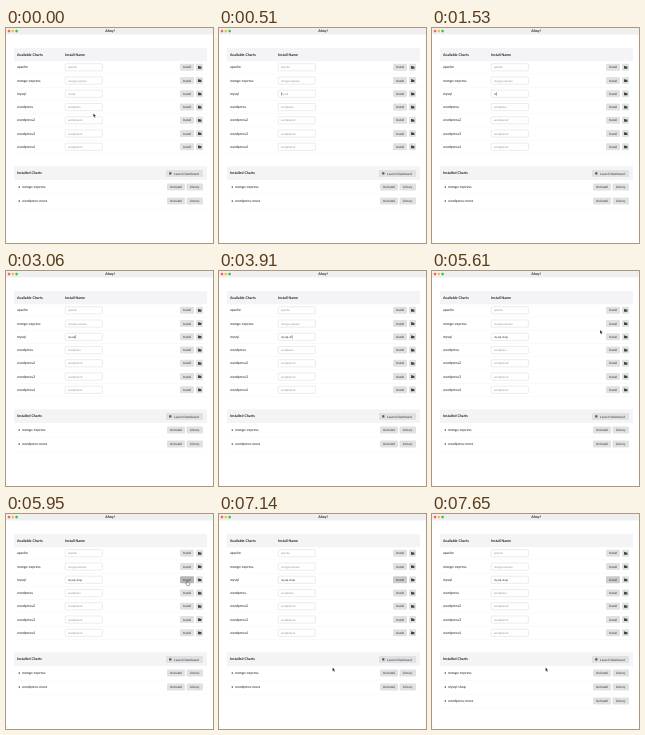
An HTML page for the animation above (8 s loop, 207 px wide and 215 px high).

```html
<!DOCTYPE html>
<html lang="en">
<head>
<meta charset="utf-8">
<title>Charts</title>
<style>
  html, body { margin: 0; width: 100%; height: 100%; overflow: hidden; background: #fff; }
  svg { display: block; width: 100vw; height: 100vh; }
  text { font-family: Lato, "Open Sans", sans-serif; font-size: 3.5px; fill: #222; text-rendering: geometricPrecision; }
  .bold { font-weight: 700; font-size: 3.6px; }
  .btn { font-weight: 700; font-size: 3px; fill: #555; text-anchor: middle; }
  .field { font-size: 2.8px; fill: #8c8c8c; }
  .typed { fill: #222; }
</style>
</head>
<body>
<svg id="stage" viewBox="0 0 207 215" preserveAspectRatio="none"></svg>
<script>
const LOOP = 8000;
const stage = document.getElementById('stage');

function add(tag, attrs, parent = stage) {
  const el = document.createElementNS('http://www.w3.org/2000/svg', tag);
  for (const key in attrs) el.setAttribute(key, attrs[key]);
  return parent.appendChild(el);
}
function rect(x, y, width, height, fill, more = {}, parent) {
  return add('rect', { x, y, width, height, fill, ...more }, parent);
}
function label(x, y, str, cls = '', parent) {
  const el = add('text', { x, y, class: cls }, parent);
  el.textContent = str;
  return el;
}
function line(y, parent) {
  rect(8, y, 193, 0.3, '#eeeeef', {}, parent);
}
function button(x, y, w, str, parent, shift = 0) {
  const box = rect(x, y, w, 7, '#e0e1e2', { rx: 1 }, parent);
  label(x + w / 2 + shift, y + 4.5, str, 'btn', parent);
  return box;
}

// Window bar
rect(0, 0, 207, 215, '#fff');
rect(0, 0, 207, 6.5, '#f0eff0');
['#ff5f57', '#febc2e', '#28c840'].forEach((fill, i) =>
  add('circle', { cx: 3 + i * 3.8, cy: 3.1, r: 1.3, fill }));
const title = label(104, 4.3, 'Ahoy!', 'bold');
title.setAttribute('text-anchor', 'middle');

// Available charts
rect(8, 20, 193, 13.3, '#f4f4f7');
label(11, 28.1, 'Available Charts', 'bold');
label(59, 28.1, 'Install Name', 'bold');

const charts = ['apache', 'mongo-express', 'mysql', 'wordpress', 'wordpress2', 'wordpress3', 'wordpress4'];
const rows = charts.map((name, i) => {
  const y = 39.3 + i * 13.25;
  line(y + 6.5);
  label(11, y + 1.1, name);
  rect(59.2, y - 3.6, 37.2, 7.2, '#fff', { rx: 1, stroke: '#cdced2', 'stroke-width': 0.4 });
  const field = label(62, y + 1, name, 'field');
  const install = button(174, y - 3.5, 14, 'Install');
  rect(190, y - 3.5, 7, 7, '#e0e1e2', { rx: 1 });
  add('path', {
    d: `M192 ${y - 1.3}h1.2l.5 .5h1.7v2.3h-3.4z`, fill: '#444'
  });
  return { field, install };
});
const { field, install } = rows[2];

// Installed charts
rect(8, 138.3, 193, 13.7, '#f4f4f7');
label(11, 146.1, 'Installed Charts', 'bold');
button(160, 142, 37, 'Launch Dashboard', stage, 2);
rect(163.2, 144.3, 2.2, 2.2, '#555', { rx: 0.3 });

function release(name, y) {
  const g = add('g', { transform: `translate(0 ${y})` });
  add('path', { d: 'M12.8 -1.2l1.3 1.2l-1.3 1.2z', fill: '#222' }, g);
  label(16, 1.1, name, '', g);
  button(161, -3.5, 18, 'Uninstall', g);
  button(180.5, -3.5, 16.5, 'Library', g);
  line(6.8, g);
  return g;
}
release('mongo-express', 159.1);
const added = release('mysql-shop', 173.1);
const last = release('wordpress-news', 173.1);
rect(0.8, 212.8, 0.6, 0.6, '#aaa');

const caret = rect(62, 64.1, 0.35, 3.5, '#222');

// Pointers, each with its hot spot at 0,0
const shapes = {
  arrow: add('path', {
    d: 'M0 0v3.7l.9-.8.6 1.4.7-.3-.6-1.4h1.2z',
    fill: '#111', stroke: '#fff', 'stroke-width': 0.3
  }),
  beam: add('path', {
    d: 'M-.7-1.9q.7 0 .7.5v2.8q0 .5-.7.5M.7-1.9q-.7 0-.7.5v2.8q0 .5.7.5',
    fill: 'none', stroke: '#333', 'stroke-width': 0.35
  }),
  hand: add('path', {
    d: 'M-.5 0q.5-.5 1 0v1.6l1.8.4q.6.2.5.8l-.4 1.7h-2.5l-1.5-1.9q.2-.6 1.1 0z',
    fill: '#fff', stroke: '#111', 'stroke-width': 0.35
  })
};

// [time, value...]
const pointerSteps = [
  [0, 'arrow', 87.3, 85.4],
  [170, 'arrow', 80, 77],
  [340, 'beam', 70, 68],
  [510, null, 62, 66],
  [5100, 'beam', 80, 65],
  [5270, 'arrow', 103, 60],
  [5440, 'arrow', 139, 57],
  [5610, 'arrow', 168, 59],
  [5780, 'hand', 181, 67],
  [6630, 'arrow', 135, 120],
  [6800, 'arrow', 113.5, 153.6]
];
const typingSteps = [
  [0, 0], [1530, 1], [2040, 2], [2550, 3], [2890, 4], [3060, 5], [3230, 6],
  [3740, 7], [3910, 8], [4080, 9], [4420, 10]
];
const caretSteps = [[0, 0], [510, 1], [1020, 0], [1530, 1], [3400, 0], [3740, 1], [4930, 0]];
const buttonSteps = [[0, '#e0e1e2'], [5780, '#cacbcd'], [5950, '#b5b6b8'], [6290, '#cacbcd']];

function at(steps, t) {
  let found = steps[0];
  for (const step of steps) if (step[0] <= t) found = step;
  return found.slice(1);
}
function show(el, on) {
  el.setAttribute('visibility', on ? 'visible' : 'hidden');
}

function draw(t) {
  const [count] = at(typingSteps, t);
  const str = count ? 'mysql-shop'.slice(0, count) : 'mysql';
  if (field.textContent !== str) field.textContent = str;
  field.setAttribute('class', count ? 'field typed' : 'field');
  caret.setAttribute('x', 62 + (count ? field.getComputedTextLength() : 0));
  show(caret, at(caretSteps, t)[0]);

  install.setAttribute('fill', at(buttonSteps, t)[0]);

  const [kind, x, y] = at(pointerSteps, t);
  for (const name in shapes) {
    show(shapes[name], name === kind);
    shapes[name].setAttribute('transform', `translate(${x} ${y})`);
  }

  const done = t >= 7650;
  added.style.display = done ? '' : 'none';
  last.setAttribute('transform', `translate(0 ${done ? 187.1 : 173.1})`);
}

const start = performance.now();
function tick() {
  draw((performance.now() - start) % LOOP);
  requestAnimationFrame(tick);
}
tick();
</script>
</body>
</html>
```
